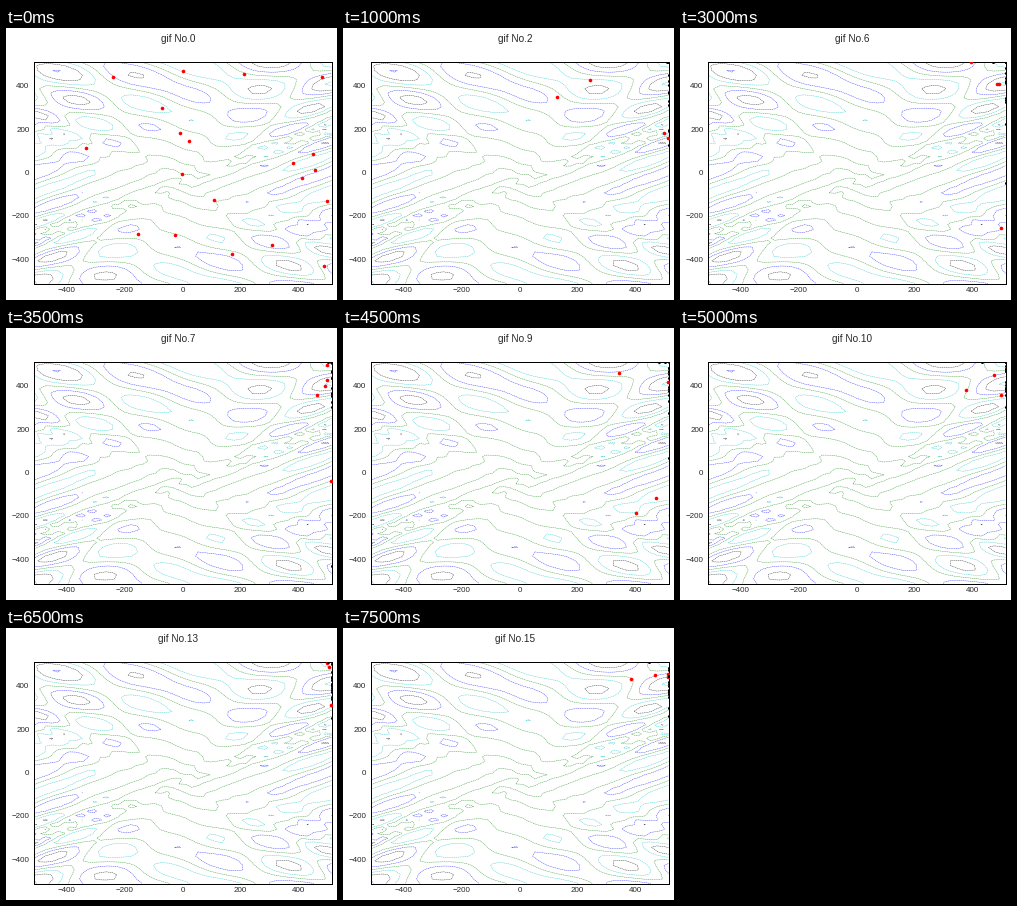
Recreate the animation shown at these times as a matplotlib script. Size 331 by 272 pixels, loop 8 s.

```python
import numpy as np
import matplotlib.pyplot as plt
from matplotlib.animation import FuncAnimation

W, H, DPI = 331, 272, 64
PX = 72 / DPI
LEFT, RIGHT, TOP, BOTTOM = 27.5, 325.5, 33.5, 255.5
LIMIT = 512
STEPS = 16
COUNT = 20
BEST = np.array([512, 404])

plt.rcParams["font.family"] = "Liberation Sans"


def eggholder(x, y):
    w = y + 47
    return -w * np.sin(np.sqrt(abs(x / 2 + w))) - x * np.sin(np.sqrt(abs(x / 2 - w)))


def swarm():
    """Particle swarm search, pulled to the lowest point and held in bounds."""
    rng = np.random.default_rng(4)
    pos = rng.uniform(-LIMIT, LIMIT, (COUNT, 2))
    vel = np.zeros_like(pos)
    own = pos.copy()
    path = [pos]
    for _ in range(STEPS - 1):
        to_own, to_best = rng.uniform(0, 1.8, (2, COUNT, 2))
        vel = 0.85 * vel + to_own * (own - pos) + to_best * (BEST - pos)
        pos = np.clip(pos + vel, -LIMIT, LIMIT)
        better = eggholder(*pos.T) < eggholder(*own.T)
        own = np.where(better[:, None], pos, own)
        path.append(pos)
    return path


path = swarm()

fig = plt.figure(figsize=(W / DPI, H / DPI), dpi=DPI, facecolor="white")
ax = fig.add_axes([LEFT / W, 1 - BOTTOM / H, (RIGHT - LEFT) / W, (BOTTOM - TOP) / H])

grid = np.linspace(-LIMIT, LIMIT, 50)
X, Y = np.meshgrid(grid, grid)
ax.contour(X, Y, eggholder(X, Y), levels=np.arange(-900, 901, 300),
           colors=["c", "k", "b", "g"], linestyles="--", linewidths=0.35 * PX)

ticks = range(-400, 401, 200)
ax.set(xlim=(-LIMIT, LIMIT), ylim=(-LIMIT, LIMIT), xticks=ticks, yticks=ticks)
ax.tick_params(length=0, labelsize=8 * PX, labelcolor="0.15")
ax.tick_params(axis="x", pad=3 * PX)
ax.tick_params(axis="y", pad=4 * PX)
for spine in ax.spines.values():
    spine.set(color="black", linewidth=PX)

title = fig.text(172.5 / W, 1 - 11 / H, "", size=10 * PX, color="0.15",
                 ha="center", va="center")
free, = ax.plot([], [], "o", color="red", ms=3.6 * PX, mew=0, zorder=3)
bound, = ax.plot([], [], "o", color="black", ms=3 * PX, mew=0, zorder=3)


def draw(step):
    pos = path[step]
    stopped = (abs(pos) >= LIMIT).any(axis=1)
    free.set_data(*pos[~stopped].T)
    bound.set_data(*pos[stopped].T)
    title.set_text(f"gif No.{step}")
    return free, bound, title


anim = FuncAnimation(fig, draw, frames=STEPS, interval=500, repeat=True, repeat_delay=0)
plt.show()
```
